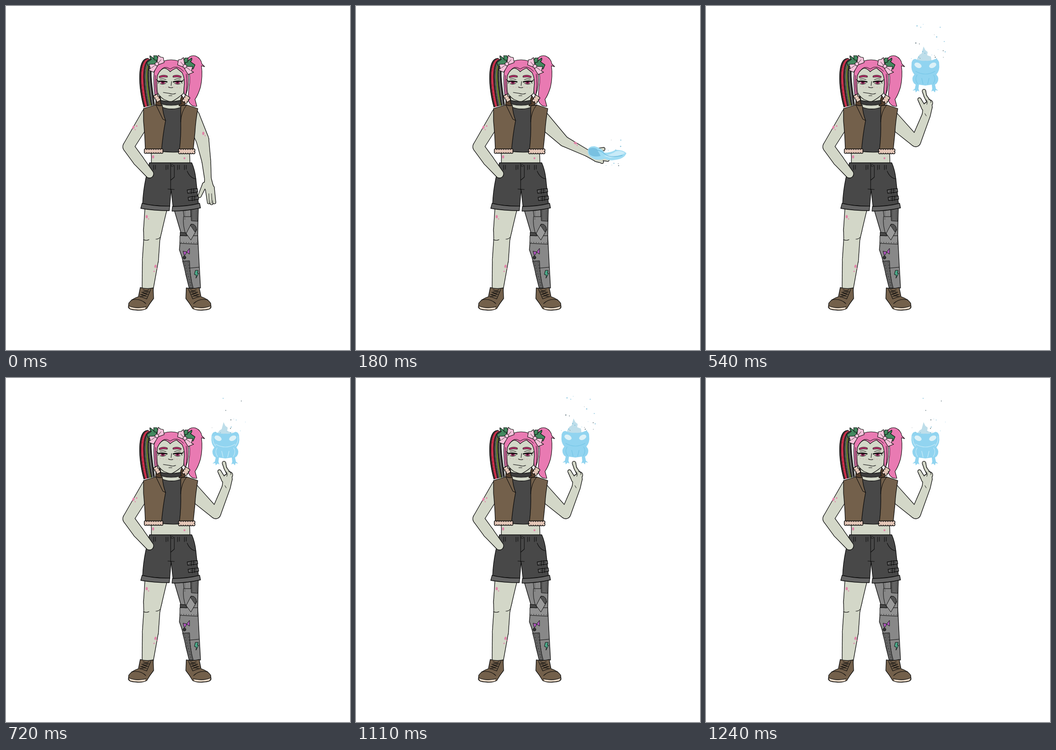
Animation, 748 px wide and 748 px high, one loop 1.37 s. Source, as an HTML page with a canvas:

```html
<!DOCTYPE html>
<html lang="en">
<head>
<meta charset="utf-8">
<title>Summoning</title>
<style>
html, body { margin: 0; width: 100%; height: 100%; overflow: hidden; background: #fff; }
canvas { display: block; }
</style>
</head>
<body>
<canvas id="stage" width="748" height="748"></canvas>
<script>
const ctx = document.getElementById('stage').getContext('2d');
const LOOP = 1370, POSE_TIME = 180, BLINK_TIME = 130, HOVER_START = 720;
const INK = '#0d0d0d', SKIN = '#d3d7c8', PINK = '#e97ab2', SPOT = '#e184a8', BROWN = '#73604b',
      DARK = '#484848', CUFF = '#656565', FUR = '#e3c6b7', STEEL = '#888', IRON = '#636363',
      LEAF = '#43895f', BOW = '#f5c3db', AQUA = '#91d4f0', ICE = '#c9ebf8';

ctx.lineJoin = ctx.lineCap = 'round';

function shape(d, fill, width = 1.3, color = INK) {
  const path = new Path2D(d);
  if (fill) { ctx.fillStyle = fill; ctx.fill(path); }
  if (width) { ctx.lineWidth = width; ctx.strokeStyle = color; ctx.stroke(path); }
}
const line = (d, width = 1.1, color = INK) => shape(d, null, width, color);
const flat = (d, fill) => shape(d, fill, 0);

function oval(x, y, rx, ry = rx, fill = ctx.fillStyle, turn = 0, width = 0) {
  ctx.beginPath();
  ctx.ellipse(x, y, rx, ry, turn, 0, Math.PI * 2);
  ctx.fillStyle = fill;
  ctx.fill();
  if (width) { ctx.lineWidth = width; ctx.strokeStyle = INK; ctx.stroke(); }
}

function placed(x, y, sx, paint) {
  ctx.save();
  ctx.translate(x, y);
  ctx.scale(sx, 1);
  paint();
  ctx.restore();
}

function seeded(seed) {
  return () => {
    seed = (seed * 16807) % 2147483647;
    return seed / 2147483647;
  };
}

// Many parts share one outline: all in ink first, then all smaller in colour
function union(fill, paint) {
  ctx.fillStyle = INK;
  paint(.65);
  ctx.fillStyle = fill;
  paint(-.65);
}

// Tapered tube through joints [x, y, radius]
function tube(joints, grow) {
  joints.forEach(([x, y, r], i) => {
    oval(x, y, r + grow);
    if (!i) return;
    const [u, v, q] = joints[i - 1], len = Math.hypot(x - u, y - v);
    const nx = (v - y) / len, ny = (x - u) / len, a = q + grow, b = r + grow;
    ctx.beginPath();
    ctx.moveTo(u + nx * a, v + ny * a);
    ctx.lineTo(x + nx * b, y + ny * b);
    ctx.lineTo(x - nx * b, y - ny * b);
    ctx.lineTo(u - nx * a, v - ny * a);
    ctx.fill();
  });
}
const limb = (...tubes) => union(SKIN, grow => tubes.forEach(t => tube(t, grow)));

function fluff(x, y, w, h, turn = 0) {
  ctx.save();
  ctx.translate(x, y);
  ctx.rotate(turn);
  union(FUR, grow => {
    ctx.fillRect(-w / 2, -h / 2, w, h);
    for (let i = 0; i <= w / 5; i++) {
      const px = -w / 2 + i * 5;
      oval(px, -h / 2, 3 + grow);
      oval(px, h / 2, 3 + grow);
    }
  });
  ctx.restore();
}

function spots(x, y, turn = 0) {
  oval(x, y, 2.4, 3.6, SPOT, turn);
  oval(x + 4, y + 5, 1.2, 1.2, SPOT);
}

function rivets(x, y, u, v, n) {
  for (let i = 0; i < n; i++) {
    const k = i / (n - 1);
    oval(x + (u - x) * k, y + (v - y) * k, .8, .8, '#222');
  }
}

// Specks thin out towards the top of their box
function sparks(seed, x, y, w, h, n) {
  const rand = seeded(seed);
  for (let i = 0; i < n; i++) {
    const r = .5 + rand() * .8;
    oval(x + w * rand(), y + h * (1 - rand() ** 2), r, r, i % 3 ? '#7fc0dc' : '#6b7d85');
  }
}

function ponytails() {
  const bands = ['#343434', '#c5243f', '#c5243f', '#343434', '#777', '#87a52c', '#343434', '#8b8b8b', '#343434'];
  const outer = [309, 114, 284, 112, 288, 180, 300, 220], inner = [322, 118, 310, 135, 318, 175, 323, 215];
  const edge = k => outer.map((a, i) => a + (inner[i] - a) * k);
  const path = ([x, y, ...c]) => `M${x} ${y}C${c}`;
  bands.forEach((color, i) => {
    const a = edge(i / bands.length), [x, y, p, q, r, s, u, v] = edge((i + 1) / bands.length);
    flat(`${path(a)}L${u} ${v}C${r} ${s} ${p} ${q} ${x} ${y}Z`, color);
    if (bands[i - 1] !== color) line(path(a), i ? .8 : 1.3);
  });
  line(path(inner), 1.3);
  shape('M393 116Q402 105 413 109Q424 114 426 126L432 132L425 130Q428 153 423 176Q418 193 411 203L415 218Q403 220 397 207Q396 190 398 177Q402 154 396 137Z', PINK, 1.1);
}

const shoulder = [404, 246, 17];
const poses = [
  () => {
    const fingers = [441, 447, 453].map((x, i) => [[438 + i * 5, 395, 5], [x, 427 + i % 2 * 2, 3.2]]);
    limb([[405, 240, 16], [427, 290, 14], [435.5, 337, 9.7], [439, 375, 7.3], [441, 393, 10]],
         [[432, 388, 5], [421, 413, 3.5]], ...fingers);
    line('M442 429L441 408M448 429L447 408', .9);
    spots(429, 277);
  },
  () => {
    limb([shoulder, [452, 294, 11], [503, 320, 7], [525, 328, 11]],
         [[514, 316, 5], [538, 311, 3.5]], [[528, 332, 8], [535, 339, 3.5]], [[528, 328, 7], [547, 334, 3.8]]);
    spots(477, 298, 2);
    splash();
  },
  () => {
    const fingers = [0, 1, 2].map(i => [[526 + i * 5, 262, 5], [543 + i * 8, 238 + i * 3, 3.5]]);
    limb([shoulder, [455, 297, 11], [506, 276, 9], [519, 262, 9]], [[515, 257, 5], [526, 238, 3.5]], ...fingers);
    line('M528 251L524 259M537 252L532 259', 1);
    spots(480, 277, 1.3);
    wisp();
  },
  low => {
    limb([shoulder, [456, 295, 11], [479, 237, 9], [482, 219, 10]],
         [[474, 222, 5], [464, 203, 3.5]], [[483, 206, 4], [477, 196, 3], [474, 185, 3.8]], [[486, 211, 7]]);
    line('M479 204Q483 209 480 214M484 203Q490 204 489 210M476 234L479 239', 1);
    frog(low);
  }
];

function legs() {
  limb([[326, 440, 24], [319, 487, 20], [317, 508, 17.5], [314, 552, 17.5], [308, 616, 12]]);
  line('M299 508Q305 511 311 508M326 507Q332 507 335 503');
  spots(306, 458);
  spots(325, 566, .2);
  oval(322, 577, 1.5, 1.5, SPOT);

  shape('M365 441L380 492L377 530Q387 557 391 584L399 615L423 613L420 559L417 500L418 440Z', STEEL);
  shape('M385 441L387 458H402V441Z', STEEL, 1);
  shape('M402 441L403 467L417 468L418 440Z', IRON, 1);
  shape('M378 500V516L417 518V500Z', '#929292', 1);
  shape('M384 555L399 554Q400 590 407 613H398Q390 578 384 555Z', IRON, 1);
  line('M399 570L420 568M386 458Q384 478 391 497', 1);
  shape('M379 492L391 493L393 500L379 499Z', DARK, 1);
  shape('M403 474L415 486L402 509L392 495Z', '#9a9a9a', 1);
  shape('M401 476Q407 471 413 480Q416 487 411 491Z', '#555', 1);
  [389, 405, 414].forEach(x => rivets(x, 446, x, 463, 5));
  rivets(381, 514, 414, 515, 7);
  rivets(388, 558, 402, 607, 9);
  rivets(396, 557, 404, 602, 8);
  shape('M393 535L385 533L388 543ZL399 527V539Z', '#b75bc4', 1);
  oval(388, 547, 3.3, 3.3, '#333', 0, .8);
  shape('M412 575H418L416 581H419L413 592L414 585L410 584Z', '#4aa889', 1);
}

function shoe() {
  shape('M-64 -29Q-50 -25 -36 -28L-35 -5Q-43 5 -50 17Q-60 22 -74 20Q-88 20 -90 14L-89 5Q-83 -4 -68 -9Z', BROWN);
  flat('M-89 11Q-74 18 -52 14L-54 18Q-69 21 -86 17Z', '#eadbca');
  line('M-89 11Q-74 18 -51 13M-83 -2Q-64 -6 -52 6M-66 -10L-50 -4L-41 -25');
  for (let i = 0; i < 3; i++) {
    line(`M${-58 - i * 3} ${-24 + i * 5}l14 5M${-45 - i * 2} ${-24 + i * 5}l-15 6`);
  }
}

function cuff(x, y, slope) {
  shape(`M${x} ${y}q31 6 59 ${slope}v10q-31 4 -60 ${1 - slope / 2}Z`, CUFF);
}

function shorts() {
  shape('M312 341H404Q411 357 413 377L419 435L363 436L359 399L356 436L297 432Q298 403 304 375Z', DARK);
  line('M358 342V400M366 346V372L358 379M352 398L366 399M394 359Q400 374 413 376');
  [321, 348, 373, 388].forEach(x => line(`M${x} 346v10m4 -10v9`));
  oval(361.5, 347, 2.2, 2.2, '#555', 0, 1);
  shape('M296 429Q323 436 356 435L355 445Q321 445 293 440Z', CUFF);
  shape('M362 436Q393 436 421 429L423 439Q392 446 361 446Z', CUFF);
  [0, 1].forEach(i => placed(394 + i * 2, 400 + i * 16, 1, () => {
    shape('M0 0L22 -3L23 4L1 7Z', '#606060');
    line('M9 -3V8M14 -3V7M5 3L18 1');
  }));
}

function torso() {
  flat('M335 198V225H382V198Z', SKIN);
  shape('M315 312Q317 328 316 343H400L399 311Z', SKIN);
  oval(320, 328, 2.3, 3.5, SPOT);
  oval(388, 331, 2, 2.2, SPOT);
  shape('M338 219Q360 229 383 219L381 317Q360 319 336 316Z', DARK);
  flat('M336 211H379V219Q359 226 339 219Z', SKIN);
}

function vest() {
  shape('M326 203L335 195L339 216L334 221L325 216Z', '#574230', 1.1);
  shape('M382 194L391 209L387 220L376 217Z', '#574230', 1.1);
  shape('M299 223L326 215Q334 218 340 216Q341 233 347 249Q341 280 338 315L303 314Q302 280 299 250Z', BROWN);
  shape('M380 217L393 215L417 223Q412 253 411 274L407 313L377 314Q381 282 380 250Z', BROWN);
  line('M326 215L341 246L347 249M393 215Q381 229 380 252');
  fluff(321, 315.5, 35, 4);
  fluff(393, 316, 30, 5);
}

function eye() {
  flat('M-5 -2H5Q5 4 0 4Q-5 4 -5 -2Z', '#a93a70');
  oval(0, 0, 2.4, 2, '#451029');
  line('M-9 -2Q0 -4 9 -1', 2.4);
  line('M-6 3Q0 6 7 2M-6 -7Q1 -9 7 -6', 1);
  for (let i = 0; i < 3; i++) line(`M${-9 + i} -2l${-5 + i} ${-4 + i * 4}`, 1.2);
}

function head() {
  shape('M327 139L326 181Q331 195 343 203L358 209Q371 203 386 190L391 145Q360 120 327 139Z', SKIN, 1.2);
  shape('M336 205Q358 210 380 205L381 213Q359 219 337 213Z', '#3b3b3b', 1.2);
  shape('M322 144Q327 127 342 120Q359 114 376 120Q391 127 396 146Q399 173 391 193Q386 194 387 179Q390 158 383 145L371 135Q364 137 357 143Q347 132 340 137Q333 141 329 152Q327 175 330 191L324 196Q320 168 322 144Z', PINK, 1.2);
  line('M334 143Q343 127 357 137Q372 126 386 142M392 148Q395 169 391 193M325 151Q324 171 327 190', 1);
  [[341, 1], [373, -1]].forEach(([x, side]) => placed(x, 166, side, () => {
    shape('M-8 -13Q1 -18 10 -14V-11Q1 -13 -7 -10Z', '#b53068', .8);
    eye();
  }));
  line('M360 164L359 173M353 176Q358 179 363 177M342 188L355 190Q363 193 369 190M354 195H361');
  for (let i = 0; i < 8; i++) oval(336 + i * 6, 175 + i * 5 % 4, .8, .8, '#d692a1');
  fluff(329, 201, 12, 4, 1);
  fluff(392, 202, 12, 6, -1);
}

function bow() {
  shape('M0 -7L-15 -18Q-16 -13 -12 -10L-22 -3L-18 6L-3 3Z', LEAF, 1.1);
  shape('M-6 -9L-7 -18H0L5 -7Z', LEAF, 1.1);
  shape('M-1 0L-17 1L-14 10L-19 13L-7 18L1 5Z', BOW, 1.1);
  shape('M0 -1L3 -19L8 -15L14 -14L16 -3L3 2Z', BOW, 1.1);
  line('M-3 2L-12 9M3 -2L9 -9', .8);
  oval(0, 0, 4, 4, BOW, 0, 1.1);
}

function splash() {
  flat('M504 314Q506 304 519 305Q535 309 540 319Q554 319 564 313Q580 312 588 320Q583 333 561 335Q549 337 541 332Q524 338 513 330Q503 324 504 314Z', '#9fdcf3');
  flat('M505 311Q513 306 523 310L532 326Q515 330 507 322Z', '#79c1e1');
  flat('M539 326Q557 322 565 316Q577 313 585 320Q570 327 553 330Z', ICE);
  line('M523 313Q535 315 541 322Q552 331 579 325', 1.3, '#6ebcdf');
  sparks(41, 537, 289, 46, 59, 11);
}

function wisp() {
  flat('M511 207Q515 197 530 197Q547 197 557 207Q564 216 578 241Q562 244 530 236L527 224Q512 222 511 207Z', '#bfe8f7');
  flat('M510 210Q511 198 526 198Q541 199 541 210Q541 221 533 224L540 231L537 238L529 226Q513 228 510 210Z', '#86cbea');
  flat('M538 202Q552 205 555 218Q558 231 570 239Q557 238 550 226Q547 213 538 202Z', '#83c9e9');
  oval(580, 178, 2.3, 2.3, '#79c3e3');
  sparks(77, 496, 164, 92, 70, 12);
}

// "low" is the settled pose with the shorter flame
function frog(low) {
  const drop = low ? 4 : 0, mark = low ? ICE : '#76c6e7';
  placed(477, drop * 2, 1, () => flat('M-20 122Q-17 107 -8 103L-4 88L0 96L5 100L4 107L12 110L14 122Z', '#bedeea'));
  [1, -1].forEach(side => placed(477, drop / 2, side, () => {
    flat('M.5 119Q-13 120 -22 115Q-30 116 -30 126Q-32 140 -24 149Q-32 158 -25 168L-21 171L-23 180L-28 184L-22 183L-21 188L-17 184L-13 186L-15 180L-14 171L.5 173Z', AQUA);
    oval(-16, 129, 8.2, 5.3, '#dcf1f8', .45);
    line('M0 148Q-11 148 -21 142M-18 150Q-24 159 -17 169M-8 157L-5 170', 1.2, mark);
    if (low) line('M-27 124Q-29 138 -21 146', 1.1, mark);
  }));
  sparks(low ? 23 : 58, 446, 38 + drop, 80, 77, low ? 16 : 22);
}

function draw(t) {
  const pose = Math.min(poses.length - 1, Math.floor(t / POSE_TIME));
  const low = t >= HOVER_START && Math.floor((t - HOVER_START) / BLINK_TIME) % 2 === 0;
  ctx.fillStyle = '#fff';
  ctx.fillRect(0, 0, 748, 748);
  ponytails();
  legs();
  [1, -1].forEach(side => placed(356, 641, side, shoe));
  torso();
  shorts();
  poses[pose](low);
  limb([[309, 235, 14], [266, 306, 12], [288, 336, 12], [312, 365, 9]]);
  spots(277, 264, .3);
  oval(284, 261, 1.8, 1.8, SPOT);
  vest();
  head();
  placed(328, 126, 1, bow);
  placed(389, 131, -1, bow);
}

const start = performance.now();
function tick() {
  draw((performance.now() - start) % LOOP);
  requestAnimationFrame(tick);
}
tick();
</script>
</body>
</html>
```
